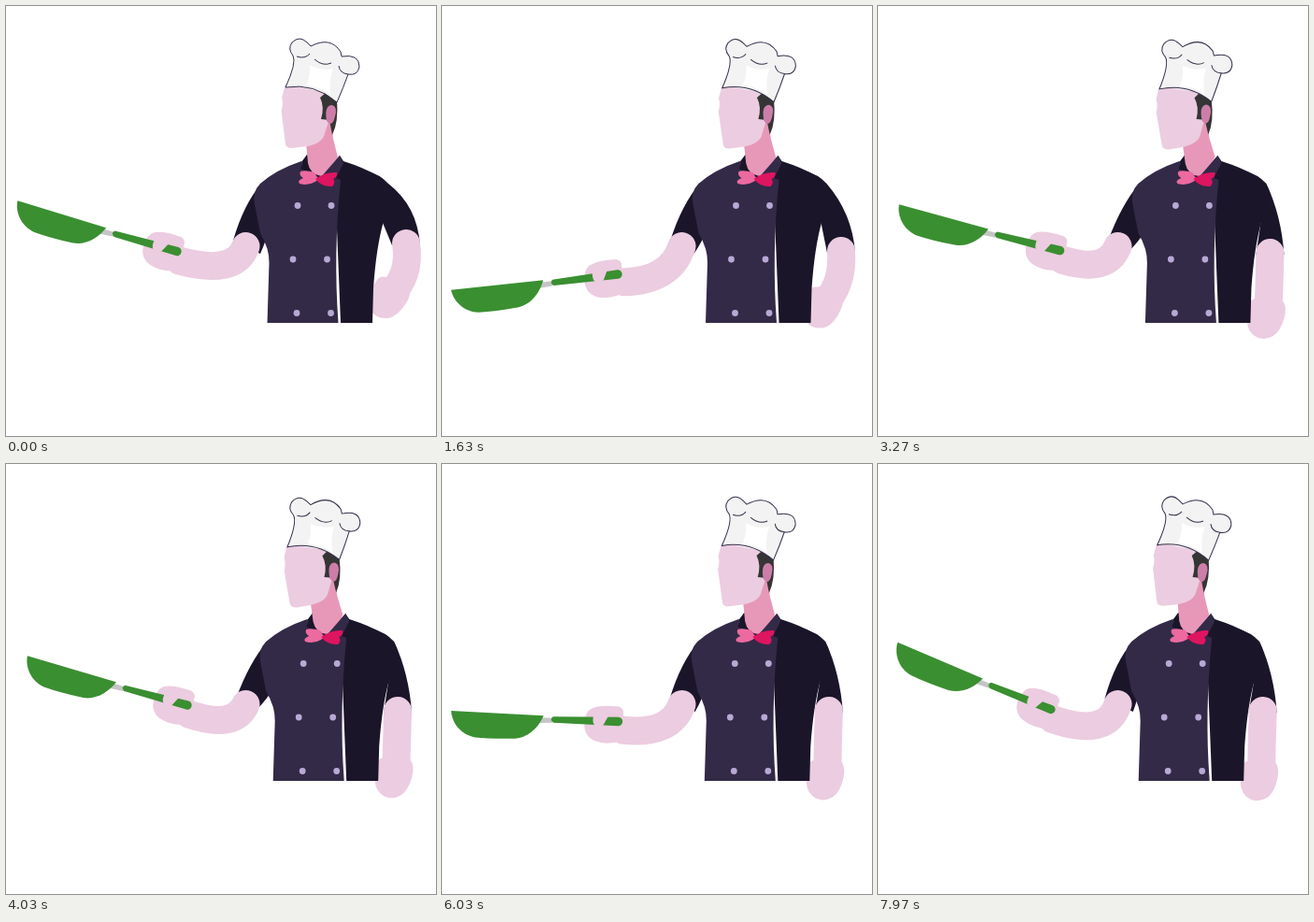
Recreate the animation shown at these times as an HTML page. Size 460 by 460 pixels, loop 8 s.

```html
<!DOCTYPE html>
<html lang="en">
<head>
<meta charset="utf-8">
<title>Chef tossing a pan</title>
<style>
  html, body { margin: 0; width: 100%; height: 100%; overflow: hidden; background: #fff; }
  svg { display: block; width: 100vw; height: 100vh; }
  .navy { fill: #1b152a; }
  .plum { fill: #332a47; }
  .skin { fill: #eccce0; }
  .green { fill: #3a8f31; }
  .limb { fill: none; stroke: #eccce0; stroke-width: 30; stroke-linecap: round; }
  .ink { fill: none; stroke: #33304a; stroke-width: 1; }
  .noodle { fill: none; stroke-width: 2; stroke-linecap: round; }
  .rose { fill: #e8689c; }
  .dark { fill: #332a3f; }
</style>
</head>
<body>
<svg viewBox="0 0 460 460">
  <defs><clipPath id="aboveRim"><rect x="-260" y="-200" width="300" height="200"/></clipPath></defs>

  <path id="restSleeve" class="navy"/>
  <path id="restArm" class="limb"/>
  <path id="restHand" class="skin" d="M-16 -20Q0 -27 16 -21Q22 -14 19 -2Q16 12 8 18Q-4 25 -14 17Q-22 10 -20 -4Q-20 -16 -16 -20Z"/>

  <path id="panSleeve" class="navy"/>

  <g id="torso">
    <path class="navy" d="M322 159L316 167L330 188H352L358 339H392L393 302Q396 258 404 230L412 197Q405 180 361 166L357 160L338 182Z"/>
    <path class="plum" d="M316 166Q289 175 272 190Q263 199 266 212L272 243Q282 260 281.500 275L279.500 339H355.500Q350 265 358 186L350 183L338 182L326 181Z"/>
    <path class="navy" d="M322 159L315 174L330 181L336 183Z"/>
    <g fill="#b7a9d4">
      <circle cx="312" cy="213.500" r="3.400"/><circle cx="348" cy="213.500" r="3.400"/>
      <circle cx="307" cy="271" r="3.400"/><circle cx="343.500" cy="271" r="3.400"/>
      <circle cx="311" cy="328.500" r="3.400"/><circle cx="347.500" cy="328.500" r="3.400"/>
    </g>
  </g>

  <g id="head">
    <path fill="#e798b9" d="M321 146L347 118L350 142L355 162Q345 181 337 182Q325 180 323 168Z"/>
    <path class="skin" d="M299 84L295 98Q297 104 294.500 112L299 148Q300 152 306 152L322 150Q339 147 341 136L347 118L350 94Z"/>
    <path fill="#353535" d="M336 98L343 92L354 100Q356 124 349 138L346 122L337 121Q341 108 336 98Z"/>
    <path fill="#cc7ea8" d="M343 123Q340 106 349 106Q355 108 352 118Q350 127 346 126Z"/>
    <path fill="#f3f3f3" d="M299 87Q311 61 307 53Q301 46 306 39Q314 31 322 39L326 43Q347 32 358 49L359 54Q378 51 378 65Q376 75 366 73Q361 87 354 103Q330 82 299 87Z"/>
    <path fill="#fff" d="M325 63Q338 70 350 67Q345 80 347 95Q336 86 321 85Q326 74 325 63Z"/>
    <path class="ink" d="M299 87Q311 61 307 53Q301 46 306 39Q314 31 322 39L326 43Q347 32 358 49L359 54Q378 51 378 65Q376 75 366 73Q361 87 354 103Q330 82 299 87ZM311 54Q320 57 325 51M330 57Q339 65 348 61M356 64Q357 72 366 73"/>
  </g>

  <g id="bow">
    <path class="plum" d="M357 160L361 168L352 186L337 183Z"/>
    <path fill="#ec6aa0" d="M334 185L330 178Q320 175 315 177Q313 181 318 184Q311 187 314 190Q324 193 334 186Z"/>
    <path fill="#de1560" d="M331 185Q342 177 354 178Q355 183 350 185Q353 189 349 193Q338 194 331 185Z"/>
  </g>

  <path id="panArm" class="limb"/>
  <g id="pan">
    <path class="skin" d="M-31 -11Q-24 -17 0 -16Q6 -14 5 -8L10 18Q-8 27 -24 22Q-37 17 -36 2Q-35 -8 -31 -11Z"/>
    <g clip-path="url(#aboveRim)"><g id="food">
      <circle class="rose" cx="-26" cy="2" r="3.300"/><circle class="rose" cx="27" cy="13" r="3.300"/>
      <circle class="dark" cx="0" cy="-7" r="2.600"/><circle class="dark" cx="18" cy="1" r="2.600"/>
      <path class="rose" d="M-2 0l5 5l-5 5l-5 -5ZM10 -6l6 3l-3 6l-6 -3Z"/>
      <path fill="#b9b0d0" d="M-22 -1Q-13 0 -13 7ZM21 -1Q30 0 30 7Z"/>
      <path class="rose" d="M-22 -1Q-21 8 -13 7ZM21 -1Q22 8 30 7Z"/>
      <path class="noodle" stroke="#b9b0d0" d="M-22 -13q4 -4 7 0t8 -5M2 -6q3 -5 6 -2t6 -3"/>
      <path class="noodle" stroke="#e8689c" d="M-21 -6q5 -4 8 1t12 1M15 -5q3 -6 6 -4t3 -4t5 -4"/>
    </g></g>
    <path fill="#c5c5c5" d="M-82 0L-70 0V5L-84 6Z"/>
    <path class="green" d="M-179 -2H-80C-84 9 -94 22 -109 24Q-135 26 -152 25C-168 23 -178 10 -179 -2Z"/>
    <path class="green" d="M-70 -1.500L0 -4.700A4.700 4.700 0 0 1 0 4.700L-69 4.800Q-74 2 -70 -1.500Z"/>
    <path class="skin" d="M-27 -11H-7L-11 -5L-16 5Q-26 9 -27 1Z"/>
  </g>
</svg>
<script>
const LOOP = 8000, TOSS = 4050;
const el = id => document.getElementById(id);

// Smooth curve through [time, value] keys that never overshoots them.
function track(...keys) {
  const slope = i => (keys[i + 1][1] - keys[i][1]) / (keys[i + 1][0] - keys[i][0]);
  const tangent = i => {
    if (i === 0 || i === keys.length - 1) return 0;
    const a = slope(i - 1), b = slope(i);
    return a * b > 0 ? 2 * a * b / (a + b) : 0;
  };
  return t => {
    let i = 0;
    while (i < keys.length - 2 && t > keys[i + 1][0]) i++;
    const [t0, v0] = keys[i], [t1, v1] = keys[i + 1], d = t1 - t0;
    const u = Math.min(1, Math.max(0, (t - t0) / d)), w = 1 - u;
    return v0 * w * w * (1 + 2 * u) + v1 * u * u * (3 - 2 * u)
      + d * u * w * (tangent(i) * w - tangent(i + 1) * u);
  };
}

const sway = track([0, 0], [1630, 2.5], [2630, 5.5], [3500, 6.5], [4030, 6.2],
  [5270, 3.7], [6030, 1.3], [7350, -1], [8000, -.8]);
const tilt = track([0, 17], [830, 4], [1630, -6], [1900, 2], [2350, 20], [2630, 26.5], [3350, 15],
  [3700, 18], [4030, 16.5], [5030, 5], [5270, -1.7], [5600, -5], [6030, 3], [6700, 20], [7500, 26], [7970, 23]);
const tipX = track([0, 183], [1630, 188], [2630, 190], [3400, 195], [4030, 194],
  [5270, 192.5], [6030, 188.5], [7970, 185]);
const tipY = track([0, 262.5], [830, 275], [1630, 287], [2630, 250.5], [3350, 262], [3700, 257],
  [4030, 258], [5270, 278], [5600, 284], [6030, 275.5], [7400, 258], [7970, 262.5]);
const lift = track([0, -22], [400, 15], [900, 54], [1220, 52], [1600, -20], [2200, -24],
  [2630, 18], [2850, 22], [3300, -24], [TOSS, -24]);

// Resting arm, relative to the swaying body.
const cuffX = track([0, 428], [1630, 424.5], [2630, 421.5], [3300, 413], [8000, 412.5]);
const cuffY = track([0, 254], [1630, 262], [3300, 264], [8000, 264]);
const bendX = track([0, 433], [1630, 427], [2630, 424], [3300, 412], [8000, 411]);
const fistX = track([0, 409], [1630, 404.5], [2630, 405], [3300, 409], [8000, 409]);
const fistY = track([0, 314], [1630, 324], [2630, 327], [3300, 335], [8000, 339]);

const put = (id, transform) => el(id).setAttribute("transform", transform);
const draw = (id, d) => el(id).setAttribute("d", d);

function render(t) {
  const s = sway(t), angle = tilt(t), x = tipX(t), y = tipY(t);
  put("torso", `translate(${s} 0)`);
  put("bow", `translate(${s} 0)`);
  put("head", `rotate(${-.42 * s} 340 45)`);

  const cx = cuffX(t) + s, cy = cuffY(t), fx = fistX(t) + s, fy = fistY(t);
  draw("restSleeve", `M${385 + s} 176Q${400 + s} 180 ${409 + s} 190Q${cx + 12} ${cy - 40} ${cx + 15} ${cy + 2}`
    + `L${cx - 15} ${cy + 2}L${403 + s} 232L${385 + s} 240Z`);
  draw("restArm", `M${cx} ${cy}Q${bendX(t) + s} ${(cy + fy) / 2 + 5} ${fx + 2} ${fy - 6}`);
  put("restHand", `translate(${fx} ${fy}) rotate(${(339 - fy) * .8})`);

  draw("panSleeve", `M${274 + s} 189Q${254 + s} 212 ${243 + s * .5} 251L${272 - s} 265`
    + `Q${278 + s * .3} 252 ${282 + s} 236Z`);
  const a = angle * Math.PI / 180, cos = Math.cos(a), sin = Math.sin(a);
  const wristX = x + 6 * cos - 9 * sin, wristY = y + 6 * sin + 9 * cos;
  draw("panArm", `M${wristX} ${wristY}Q245 ${wristY + 3 + angle * .75} 256.5 257`);
  put("pan", `translate(${x} ${y}) rotate(${angle})`);

  const up = lift(t % TOSS);
  put("food", `translate(${-129.5 - up * .28} ${-2 - up})`);
}

function frame(now) {
  render(now % LOOP);
  requestAnimationFrame(frame);
}
render(0);
requestAnimationFrame(frame);
</script>
</body>
</html>
```
